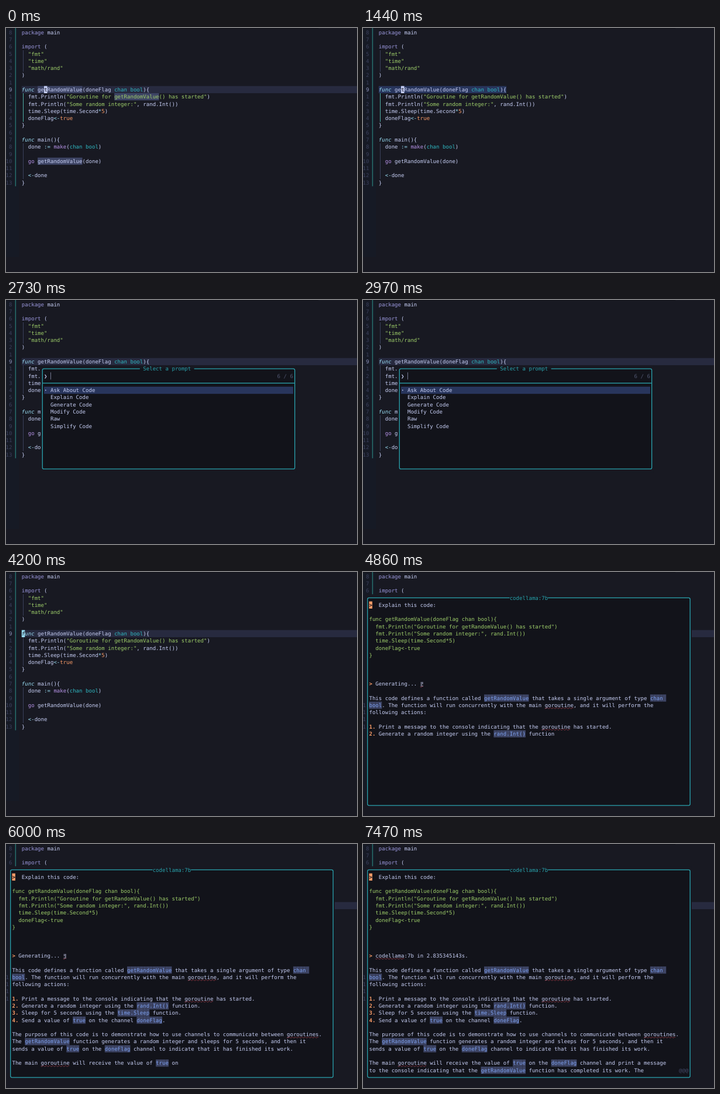
An HTML page with a canvas for the animation above (8400 ms loop, 600x419 px).

```html
<!DOCTYPE html>
<html lang="en">
<head>
<meta charset="utf-8">
<title>Explain code in the editor</title>
<style>
  html, body { margin: 0; height: 100%; overflow: hidden; background: #181922; }
  canvas { display: block; width: 600px; height: 419px; }
</style>
</head>
<body>
<canvas id="stage" width="600" height="419"></canvas>
<script>
const ctx = document.getElementById('stage').getContext('2d');
const LOOP = 8400, CELL_W = 5.46, CELL_H = 12.29;
const FONT = '9.07px "DejaVu Sans Mono", "Noto Sans Mono", monospace';
const C = {
  bg: '#181922', float: '#12131a', line: '#272a3f', fg: '#c6cef4', dim: '#3b405c', number: '#8d93bb',
  border: '#2aa3ae', visual: '#28355c', ref: '#3d4464', green: '#9ece6a', lilac: '#9a97dc', purple: '#b592e6',
  cyan: '#98dcf2', teal: '#2fb8c2', orange: '#fb9c68', blue: '#7c9fee', red: '#c24a56', sign: '#28706e', scope: '#4fb0a8'
};

const CODE = [
  'package main', '', 'import (', '  "fmt"', '  "time"', '  "math/rand"', ')', '',
  'func getRandomValue(doneFlag chan bool){',
  '  fmt.Println("Goroutine for getRandomValue() has started")',
  '  fmt.Println("Some random integer:", rand.Int())',
  '  time.Sleep(time.Second*5)', '  doneFlag<-true', '}', '',
  'func main(){', '  done := make(chan bool)', '', '  go getRandomValue(done)', '', '  <-done', '}'
];
const FUNC_ROW = 8, FUNC_END = 13;
// Backticks mark inline code, underscores mark misspelled words.
const ANSWER = [
  'This code defines a function called `getRandomValue` that takes a single argument of type `chan ',
  'bool`. The function will run concurrently with the main _goroutine_, and it will perform the',
  'following actions:', '',
  '1. Print a message to the console indicating that the _goroutine_ has started.',
  '2. Generate a random integer using the `rand.Int()` function.',
  '3. Sleep for 5 seconds using the `time.Sleep` function.',
  '4. Send a value of `true` on the channel `doneFlag`.', '',
  'The purpose of this code is to demonstrate how to use channels to communicate between _goroutines_.',
  'The `getRandomValue` function generates a random integer and sleeps for 5 seconds, and then it',
  'sends a value of `true` on the `doneFlag` channel to indicate that it has finished its work.', '',
  'The main _goroutine_ will receive the value of `true` on the `doneFlag` channel and print a message',
  'to the console indicating that the `getRandomValue` function has completed its work. The'
];
const PLAIN = ANSWER.join('\n').replace(/[`_]/g, '');
// Streaming pace: [time, characters shown]
const PACE = [
  [4290, 0],
  [4860, PLAIN.indexOf('.\n3.')],
  [6000, PLAIN.indexOf(' the doneFlag channel and')],
  [6330, PLAIN.length]
];

const X = col => col * CELL_W - 0.5;
const Y = row => row * CELL_H + 1.36;

function fill(col, row, cols, color) {
  ctx.fillStyle = color;
  ctx.fillRect(X(col), Y(row), cols * CELL_W, CELL_H);
}

function text(str, col, row, color = C.fg, style = '') {
  ctx.font = style + ' ' + FONT;
  ctx.fillStyle = color;
  [...str].forEach((ch, i) => ch !== ' ' && ctx.fillText(ch, X(col + i), Y(row) + 9.3));
}

function squiggle(col, row, cols) {
  ctx.strokeStyle = C.red;
  ctx.lineWidth = 0.7;
  ctx.beginPath();
  for (let x = 0; x <= cols * CELL_W; x += 0.5)
    ctx.lineTo(X(col) + x, Y(row) + 11.3 + 0.8 * Math.sin(x * 2 * Math.PI / CELL_W));
  ctx.stroke();
}

function highlight(line) {
  const rules = [
    [/"[^"]*"/y, C.green], [/(package|import)\b/y, C.lilac], [/func\b/y, C.cyan, 'italic'],
    [/(go|make)\b/y, C.purple], [/(chan|bool)\b/y, C.teal], [/true|\d+/y, C.orange],
    [/<-|:=|\*/y, C.cyan], [/\w+|./y, C.fg]
  ];
  const tokens = [];
  for (let at = 0; at < line.length;) {
    for (const [pattern, color, style] of rules) {
      pattern.lastIndex = at;
      const match = pattern.exec(line);
      if (!match) continue;
      tokens.push({ at, str: match[0], color, style });
      at += match[0].length;
      break;
    }
  }
  return tokens;
}
const TOKENS = CODE.map(highlight);

function drawCursor(row, col) {
  const token = TOKENS[row].findLast(t => t.at <= col);
  fill(5 + col, row, 1, token.color);
  text(CODE[row][col], 5 + col, row, C.bg, token.style);
}

function drawGuide(from, to, color) {
  ctx.fillStyle = color;
  ctx.fillRect(29, Y(from), 1, (to - from + 1) * CELL_H);
}

function drawEditor(t) {
  const visual = t >= 1440 && t < 2640;
  const row = visual ? FUNC_ROW + [1620, 1740, 1830, 2010, 2130].filter(at => t >= at).length : FUNC_ROW;
  const inside = t < 2640;

  ctx.fillStyle = C.bg;
  ctx.fillRect(0, 0, 600, 419);
  ctx.fillStyle = '#161a25';
  ctx.fillRect(0, 0, 22, 393);
  ctx.fillStyle = '#101118';
  ctx.fillRect(0, 0, 534, 1);

  if (!visual) fill(5, FUNC_ROW, 106, C.line);
  else for (let r = FUNC_ROW; r <= row; r++) fill(5, r, CODE[r].length, C.visual);
  if (t < 1440)
    CODE.forEach((line, r) => {
      const at = line.indexOf('getRandomValue');
      if (at >= 0) fill(5 + at, r, 14, C.ref);
    });

  ctx.fillStyle = C.sign;
  ctx.fillRect(15.6, 0, 1.5, Y(CODE.length));
  drawGuide(3, 5, C.dim);
  drawGuide(9, 12, inside ? C.scope : C.dim);
  drawGuide(16, 20, C.dim);

  TOKENS.forEach((tokens, r) => {
    const number = r === row ? r + 1 : Math.abs(r - row);
    text(String(number).padStart(2), 0, r, r === row ? C.number : C.dim);
    tokens.forEach(k => text(k.str, 5 + k.at, r, k.color, k.style));
  });
  if (t < 2730 || (t >= 4200 && t < 4230))
    drawCursor(row, !inside || row === FUNC_END ? 0 : 7);
}

// Floating window whose border runs through the middle of its outer cells.
function drawWindow(left, top, right, bottom, title, titleCol) {
  for (let r = top; r <= bottom; r++) fill(left, r, right - left + 1, C.bg);
  const mid = (col, row) => [X(col + 0.5), Y(row + 0.5)];
  const [x, y] = mid(left, top), [x2, y2] = mid(right, bottom);
  ctx.beginPath();
  ctx.roundRect(x, y, x2 - x, y2 - y, 2.5);
  ctx.fillStyle = C.float;
  ctx.fill();
  ctx.strokeStyle = C.border;
  ctx.lineWidth = 1.3;
  ctx.stroke();
  ctx.fillStyle = C.float;
  ctx.fillRect(X(titleCol), y - 1, title.length * CELL_W, 2);
  text(title, titleCol, top, C.border);
}

function drawPicker(t) {
  drawWindow(11, 9, 90, 23, ' Select a prompt ', 42);
  ctx.fillStyle = C.border;
  ctx.fillRect(X(11.5), Y(11.5) - 0.6, 79 * CELL_W, 1.3);
  text('❯', 12, 10, C.fg, 'bold');
  ctx.fillStyle = '#777c96';
  ctx.fillRect(X(14), Y(10), 1, CELL_H);
  text('6 / 6', 85, 10, '#50566f');
  const selected = t < 4170 ? 0 : 1;
  fill(12, 12 + selected, 78, C.visual);
  text('·', 12, 12 + selected, C.fg, 'bold');
  ['Ask About Code', 'Explain Code', 'Generate Code', 'Modify Code', 'Raw', 'Simplify Code']
    .forEach((item, i) => text(item, 14, 12 + i));
}

function shownCount(t) {
  const i = PACE.findLastIndex(([at]) => t >= at);
  if (i < 0) return 0;
  if (i === PACE.length - 1) return PLAIN.length;
  const [t0, n0] = PACE[i], [t1, n1] = PACE[i + 1];
  const step = Math.floor((t - t0) / 90) * 90;
  let n = Math.floor(n0 + (n1 - n0) * step / (t1 - t0));
  while (n > 0 && /\w\w/.test(PLAIN.slice(n - 1, n + 1))) n--;
  return n;
}

function drawAnswer(count) {
  let code = false, spell = false;
  ANSWER.forEach((line, i) => {
    const row = 17 + i, list = /^\d\./.test(line);
    let col = 2;
    for (const ch of line) {
      if (ch === '`') { code = !code; continue; }
      if (ch === '_') { spell = !spell; continue; }
      if (count-- <= 0) return;
      const marker = list && col < 4;
      if (code) fill(col, row, 1, C.ref);
      text(ch, col, row, code ? C.blue : marker ? C.orange : C.fg, marker ? 'bold' : '');
      if (spell) squiggle(col, row, 1);
      col++;
    }
    count--;
  });
}

function drawSpinner(t) {
  const gap = Math.floor(t / 90) % 8;
  ctx.fillStyle = '#9a9fb8';
  for (let i = 0; i < 8; i++)
    if (i !== gap) ctx.fillRect(X(18) + 1 + (i >> 2) * 2.2, Y(15) + 3.2 + (i % 4) * 2, 1.7, 1.6);
  squiggle(18, 15, 1);
}

function drawChat(t) {
  drawWindow(1, 3, 102, 32, 'codellama:7b', 46);
  fill(2, 4, 1, C.orange);
  text('>', 2, 4, C.float, 'bold');
  text('Explain this code:', 5, 4);
  CODE.slice(FUNC_ROW, FUNC_END + 1).forEach((line, i) => text(line, 2, 6 + i, C.green));
  text('>', 2, 15, C.orange, 'bold');
  if (t < 6720) {
    text('Generating...', 4, 15);
    drawSpinner(t);
  } else {
    text('codellama:7b in 2.835345143s.', 4, 15);
    squiggle(4, 15, 9);
  }
  drawAnswer(shownCount(t));
  if (t >= 6330) text('@@@', 99, 31, '#434967');
}

function frame(now) {
  const t = now % LOOP;
  ctx.textRendering = 'geometricPrecision';
  drawEditor(t);
  if (t >= 2730 && t < 4200) drawPicker(t);
  if (t >= 4230) drawChat(t);
  requestAnimationFrame(frame);
}
frame(0);
</script>
</body>
</html>
```
